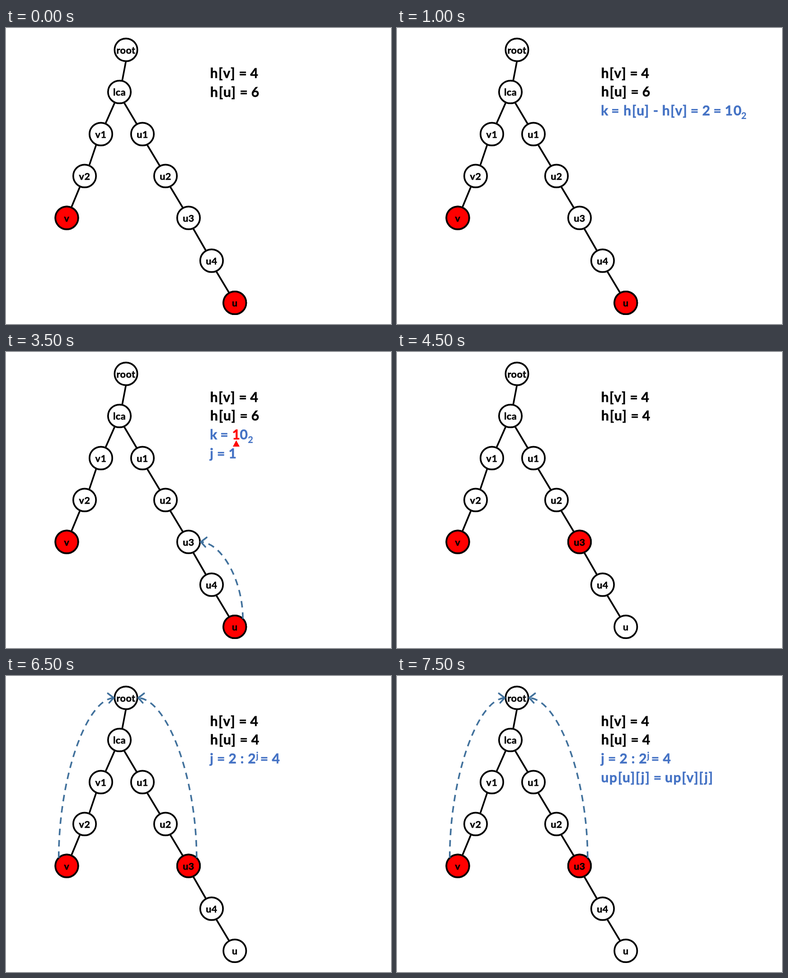
Write an HTML page that moves like this. It is 852 px wide and 657 px high and loops after 8000 ms.

```html
<!DOCTYPE html>
<html lang="en">
<head>
<meta charset="utf-8">
<title>Binary lifting</title>
<style>
html, body { margin: 0; width: 100%; height: 100%; overflow: hidden; background: #fff; }
svg { display: block; width: 100%; height: 100%; }
text {
  font: bold 30px Lato, "Open Sans", sans-serif; letter-spacing: 1.7px; text-anchor: middle;
  fill: var(--ink, #000); stroke: var(--ink, #000); stroke-width: .6;
}
.label { font-size: 21.5px; letter-spacing: .5px; }
.small { font-size: 20px; letter-spacing: 0; stroke-width: .2; }
.sign { font: bold 26px "DejaVu Sans", sans-serif; letter-spacing: 0; stroke-width: 0; }
.blue { --ink: #4472c4; }
.red { --ink: #f00; fill: #f00; }
.tree { fill: #fff; stroke: #000; stroke-width: 3.7; }
.jump { fill: none; stroke: #41719c; stroke-width: 3.6; }
.dash { stroke-dasharray: 14.4 10.8; }

/* Every part switches hard within one 8 s cycle. */
.cycle { animation: 8s step-end infinite; }
.settle { animation-name: settle; }
.uneven { animation-name: uneven; }
.level { animation-name: level; visibility: hidden; }
.diff { animation-name: diff; visibility: hidden; }
.bits { animation-name: bits; visibility: hidden; }
.bit0 { animation-name: bit0; visibility: hidden; }
.bit1 { animation-name: bit1; visibility: hidden; }
.differ { animation-name: differ; visibility: hidden; }
.search { animation-name: search; visibility: hidden; }
.equal { animation-name: equal; visibility: hidden; }
@keyframes settle { 0% { transform: translateY(.8px); } 12.5%, 100% { transform: none; } }
@keyframes uneven { 0% { visibility: visible; } 56.25%, 100% { visibility: hidden; } }
@keyframes level { 0% { visibility: hidden; } 56.25%, 100% { visibility: visible; } }
@keyframes diff { 0%, 31.25%, 100% { visibility: hidden; } 12.5% { visibility: visible; } }
@keyframes bits { 0%, 56.25%, 100% { visibility: hidden; } 31.25% { visibility: visible; } }
@keyframes bit0 { 0%, 43.75%, 100% { visibility: hidden; } 31.25% { visibility: visible; } }
@keyframes bit1 { 0%, 56.25%, 100% { visibility: hidden; } 43.75% { visibility: visible; } }
@keyframes differ { 0%, 81.25%, 100% { visibility: hidden; } 68.75% { visibility: visible; } }
@keyframes search { 0% { visibility: hidden; } 81.25%, 100% { visibility: visible; } }
@keyframes equal { 0% { visibility: hidden; } 93.75%, 100% { visibility: visible; } }
</style>
</head>
<body>
<svg id="stage" viewBox="0 0 852 657"></svg>
<script>
const LINES = [110.7, 152.3, 194, 235.5];
const RADIUS = 25.2;
const nodes = {
  root: [265.5, 48.5], lca: [251, 142],
  v1: [210, 235.5], v2: [174, 328.5], v: [134.5, 421.5],
  u1: [302, 235.5], u2: [353, 328.5], u3: [404, 421.5], u4: [455, 516.5], u: [506.3, 610]
};
const branches = [['lca', 'v1', 'v2', 'v'], ['lca', 'u1', 'u2', 'u3', 'u4', 'u']];

const group = (cls, ...parts) => `<g class="${cls}">${parts.join('')}</g>`;
const timed = (name, ...parts) => group('cycle ' + name, ...parts);
const text = (x, y, str, cls = '') => `<text x="${x}" y="${y}" class="${cls}">${str}</text>`;

// Words are pairs of centre and string on one line.
const row = (line, cls, ...words) =>
  words.map(([x, str]) => text(x, LINES[line], str, cls)).join('');

const circle = (name, cls = '') =>
  `<circle cx="${nodes[name][0]}" cy="${nodes[name][1]}" r="${RADIUS}" class="${cls}"/>`;

const edge = (from, to) => {
  const [x1, y1] = nodes[from], [x2, y2] = nodes[to];
  const [out, into] = x2 > x1 ? [10.5, -13] : [-10.5, 10];
  return `<path d="M${x1 + out} ${y1 + 24}L${x2 + into} ${y2 - 23}"/>`;
};

// Leaves the upper diagonal of one node upwards and enters the side of another horizontally.
const jump = (from, to, side) => {
  const diagonal = RADIUS * Math.SQRT1_2;
  const x1 = nodes[from][0] + side * diagonal, y1 = nodes[from][1] - diagonal;
  const x2 = nodes[to][0] + side * RADIUS, y2 = nodes[to][1];
  const tip = x2 + side * 2;
  return group('jump',
    `<path class="dash" d="M${x1} ${y1}C${x1} ${(y1 + y2) / 2} ${(x1 + x2) / 2} ${y2} ${x2} ${y2}"/>`,
    `<path stroke-linecap="round" d="M${tip + 13 * side} ${y2 - 10}L${tip} ${y2}L${tip + 10 * side} ${y2 + 11}"/>`);
};

const pointer = x => `<path class="red" d="M${x} 196l7.5 14h-15z"/>`;

const edges = branches.flatMap(b => b.slice(1).map((to, i) => edge(b[i], to))).join('');

const tree = group('tree',
  '<path d="M265.7 72L257 118"/>', edges,
  ...Object.keys(nodes).map(name => circle(name)),
  circle('v', 'red'),
  timed('uneven', circle('u', 'red')),
  timed('level', circle('u3', 'red')));

const labels = Object.entries(nodes).map(([name, [x, y]]) => text(x, y + 8, name, 'label')).join('');

const heights = timed('settle',
  row(0, '', [480, 'h[v]'], [525, '='], [550, '4']),
  row(1, '', [481, 'h[u]'], [527, '=']),
  timed('uneven', row(1, '', [552.3, '6'])),
  timed('level', row(1, '', [552.3, '4'])));

const difference = timed('diff',
  row(2, 'blue', [460, 'k'], [483.7, '='], [530.3, 'h[u]'], [573.5, '-'], [615, 'h[v]'],
    [659.3, '='], [685, '2'], [709.8, '='], [744.7, '10']),
  text(767.5, 202, '2', 'blue small'));

const bits = timed('bits',
  row(2, 'blue', [460, 'k'], [483.7, '=']),
  text(541, 202, '2', 'blue small'),
  row(3, 'blue', [456, 'j'], [476.5, '=']));

const lowBit = timed('bit0',
  row(2, 'blue', [510, '1']), row(2, 'red', [527, '0']), row(3, 'blue', [502, '0']),
  pointer(526.5),
  jump('u', 'u4', 1));

const highBit = timed('bit1',
  row(2, 'red', [510, '1']), row(2, 'blue', [527, '0']), row(3, 'blue', [502, '1']),
  pointer(509.5),
  jump('u', 'u3', 1));

const differ = timed('differ',
  row(2, 'blue', [460.5, 'u'], [517.5, 'v']), text(489, 194, '≠', 'blue sign'));

const search = timed('search',
  row(2, 'blue', [456, 'j'], [476.5, '='], [502, '2'], [523.5, ':'], [544.7, '2'], [572.2, '='], [598, '4']),
  text(556, 184, 'j', 'blue small'),
  jump('v', 'root', -1),
  jump('u3', 'root', 1));

const equal = timed('equal',
  row(3, 'blue', [506, 'up[u][j]'], [577.3, '='], [646.8, 'up[v][j]']));

document.getElementById('stage').innerHTML =
  tree + labels + heights + difference + bits + lowBit + highBit + differ + search + equal;
</script>
</body>
</html>
```
